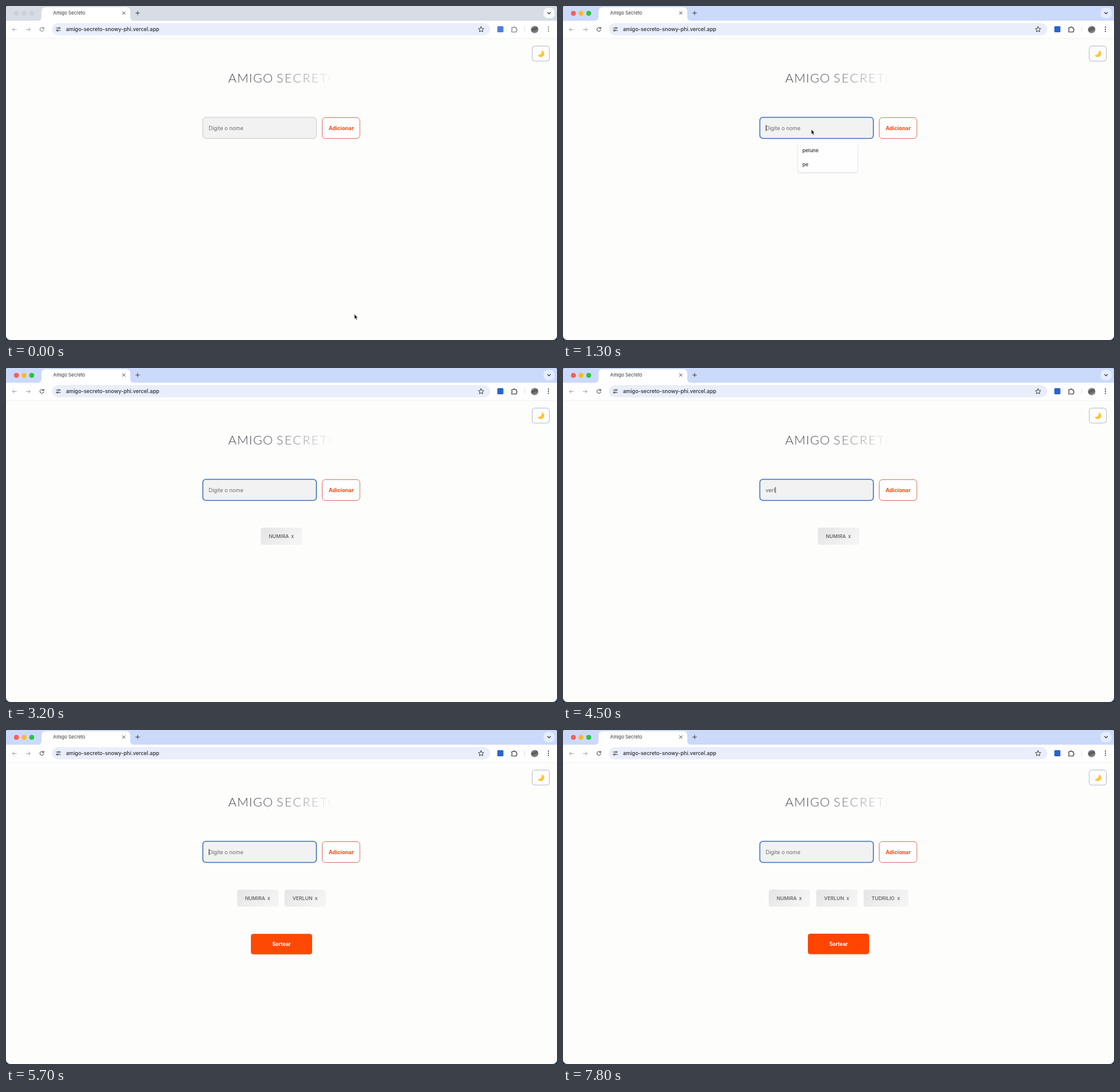
An HTML page that plays this animation: 900 px wide and 546 px high, repeating every 8000 ms.

```html
<!DOCTYPE html>
<html lang="pt">
<head>
<meta charset="utf-8">
<title>Amigo Secreto</title>
<style>
  html, body { margin: 0; width: 900px; height: 546px; overflow: hidden; background: #17304d; }
  svg { display: block; border-radius: 3px 3px 7px 7px; background: #fdfdfc; }
  text { font-family: Inter, "Liberation Sans", sans-serif; }
  .line { fill: none; stroke-linecap: round; stroke-linejoin: round; }
  .idle { --bar: #d7dce5; --ink: #777; --soft: #aaa; --r: #ccd0d8; --y: #ccd0d8; --g: #ccd0d8; --drop: #f8f9fb; --ext: #4c7fda; }
  .active { --bar: #cbdafb; --ink: #333; --soft: #a2a3a6; --r: #fb5d55; --y: #fdb92c; --g: #2bc440; --drop: #e5edfd; --ext: #2a63cb; }
  .ink { stroke: var(--ink); }
  .soft { stroke: var(--soft); }
</style>
</head>
<body>
<svg id="stage" class="idle" width="900" height="546" viewBox="0 0 900 546">
  <defs>
    <linearGradient id="fade" gradientUnits="userSpaceOnUse" x1="363" x2="534" y1="0" y2="0">
      <stop stop-color="#3c3c42"/><stop offset=".42" stop-color="#5c5c62"/>
      <stop offset=".75" stop-color="#a8a8ac"/><stop offset="1" stop-color="#fdfdfc"/>
    </linearGradient>
    <linearGradient id="chip" x2="1" y2=".4">
      <stop stop-color="#e5e5e6"/><stop offset="1" stop-color="#f4f4f4"/>
    </linearGradient>
    <linearGradient id="photo" x2=".4" y2="1">
      <stop stop-color="#b5b5b5"/><stop offset=".5" stop-color="#555"/><stop offset="1" stop-color="#8b8b8b"/>
    </linearGradient>
    <filter id="shade" x="-20%" y="-30%" width="140%" height="170%">
      <feDropShadow dx="0" dy="1" stdDeviation="1.5" flood-color="#556" flood-opacity=".25"/>
    </filter>
  </defs>

  <!-- tab strip -->
  <path d="M0 0H900V24H0Z" style="fill:var(--bar)"/>
  <circle cx="17" cy="12" r="4" style="fill:var(--r)"/>
  <circle cx="29.5" cy="12" r="4" style="fill:var(--y)"/>
  <circle cx="42" cy="12" r="4" style="fill:var(--g)"/>
  <path d="M52 24Q58 24 58 18V9Q58 2 65 2H196Q203 2 203 9V18Q203 24 209 24Z" fill="#fff"/>
  <text x="77" y="14" font-size="7.5" fill="#333">Amigo Secreto</text>
  <path class="line" stroke="#333" d="M190.5 9.5l4 4m0-4l-4 4"/>
  <path class="line" stroke="#444" d="M212 11.5h6m-3-3v6"/>
  <rect x="878" y="3" width="18" height="17" rx="7" style="fill:var(--drop)"/>
  <path class="line" stroke="#333" stroke-width="1.1" d="M884.7 10.5l2.3 2.3 2.3-2.3"/>

  <!-- toolbar -->
  <path d="M0 24H900V53H0Z" fill="#fff"/>
  <path d="M0 53H900" stroke="#eff0f3"/>
  <path class="line soft" d="M17 38.5h-6.5m2.7-2.7l-2.7 2.7 2.7 2.7M33 38.5h6.5m-2.7-2.7l2.7 2.7-2.7 2.7"/>
  <path class="line ink" d="M61.2 36.2a3.2 3.2 0 1 0 .6 2.8M61.8 34.7v2.2h-2.200"/>
  <rect x="75" y="28" width="716" height="20" rx="10" fill="#e9eefa"/>
  <path class="line" stroke="#444" d="M82 36h2.5m3.500 0h1M82 40h1m3 0h3"/>
  <circle class="line" stroke="#444" cx="86.5" cy="36" r="1.2"/>
  <circle class="line" stroke="#444" cx="84" cy="40" r="1.2"/>
  <text x="98" y="41.3" font-size="8.55" font-weight="500" fill="#2b2d31">amigo-secreto-snowy-phi.vercel.app</text>
  <path class="line" stroke="#444" d="M776 33.800l1.300 2.900 3.100.3-2.300 2.100.7 3.100-2.800-1.600-2.800 1.600.7-3.100-2.300-2.100 3.100-.3z"/>
  <rect x="802.5" y="33" width="10" height="10" rx="1.5" style="fill:var(--ext)"/>
  <path class="line ink" stroke-width="1.1" d="M826 35.5h2.500a1.400 1.400 0 0 1 2.800 0h2.200v2.200a1.400 1.400 0 0 1 0 2.800v2h-7.500v-2.200a1.400 1.400 0 0 0 0-2.600z"/>
  <path d="M847 34v8" stroke="#cfdaf3"/>
  <circle cx="863.5" cy="38.5" r="6" fill="url(#photo)"/>
  <g style="fill:var(--ink)"><circle cx="886" cy="34.5" r="1"/><circle cx="886" cy="38" r="1"/><circle cx="886" cy="41.5" r="1"/></g>

  <!-- page -->
  <rect x="859.5" y="65.5" width="28" height="24.5" rx="4" fill="#fdfdfe" stroke="#b9bcc6"/>
  <path d="M875.5 72.500A5.700 5.700 0 1 1 868.500 80.500Q875.500 80 875.500 72.500Z" fill="#fcc53a"/>
  <text y="124.5" fill="url(#fade)" style="font:300 20.5px Lato,sans-serif"><tspan x="363" letter-spacing="1">AMIGO</tspan><tspan x="442" letter-spacing="2">SECRETO</tspan></text>
  <rect id="box" x="321.5" y="182" width="185.500" height="34.500" rx="5" fill="#f2f2f2"/>
  <text id="field" x="331" y="202.500" font-size="8.700"></text>
  <path id="caret" stroke="#333" stroke-width=".9"/>
  <rect x="516.5" y="182.500" width="61.500" height="34" rx="5" fill="#fff" stroke="#dc7560"/>
  <text x="547.5" y="202.500" font-size="8.700" font-weight="700" fill="#f8480f" text-anchor="middle">Adicionar</text>
  <g id="chips"></g>
  <g id="draw">
    <rect x="400" y="333" width="100" height="33.500" rx="4" fill="#ff4500"/>
    <text x="450" y="352.500" font-size="8.300" font-weight="700" fill="#fff" text-anchor="middle">Sortear</text>
  </g>
  <g id="menu" font-size="8.200" font-weight="500" fill="#333">
    <rect x="384" y="223" width="97" height="48.500" rx="4" fill="#fefefe" filter="url(#shade)"/>
    <text x="391" y="239">pelune</text>
    <text x="391" y="261.500">pe</text>
  </g>
  <path id="mouse" d="M0 0V8.500L2 6.800 3.400 9.800 4.800 9.200 3.500 6.200H6Z" fill="#111" stroke="#fff" stroke-width=".7"/>
</svg>
<script>
const LOOP = 8000, STEP = 100;
const $ = id => document.getElementById(id);
const clamp = v => Math.max(0, Math.min(1, v));
const show = (el, on) => el.setAttribute('visibility', on ? 'visible' : 'hidden');

// name, moment of each key press, moment of Enter, chip width
const people = [
  { name: 'numira', keys: [1800, 2100, 2300, 2400, 2500, 2600], enter: 3000, w: 67.5 },
  { name: 'verlun', keys: [4000, 4100, 4200, 4500, 4600, 4700], enter: 4900, w: 67.5 },
  { name: 'tudrilio', keys: [6000, 6100, 6300, 6500, 6600, 6800, 6900, 7000], enter: 7500, w: 73 }
];
const strokes = [1100, 1300, ...people.flatMap(p => p.keys)];

function typed(t) {
  const p = people.find(p => t >= p.keys[0] && t < p.enter);
  return p ? p.name.slice(0, p.keys.filter(k => k <= t).length) : '';
}

function chips(t) {
  const list = people.filter(p => t >= p.enter);
  let x = 450 - (list.reduce((sum, p) => sum + p.w + 10, -10)) / 2;
  return list.map(({ name, w }) => {
    const chip = `<g transform="translate(${x} 261)" font-size="8.1" font-weight="500" fill="#5a5a5c">
      <rect width="${w}" height="28" rx="4" fill="url(#chip)"/>
      <text x="13" y="16.5">${name.toUpperCase()}</text><text x="${w - 18}" y="16.5">x</text></g>`;
    x += w + 10;
    return chip;
  }).join('');
}

let last = -1;
function render(t) {
  if (t === last) return;
  last = t;
  const focus = t >= 1100, text = typed(t);
  $('stage').setAttribute('class', t < 800 ? 'idle' : 'active');
  $('box').setAttribute('stroke', focus ? '#4677c0' : '#c9c9cb');
  $('box').setAttribute('stroke-width', focus ? 1.6 : 1);

  const field = $('field');
  field.textContent = text || 'Digite o nome';
  field.setAttribute('fill', text ? '#58585a' : '#6c6c6f');
  const end = 331.7 + (text ? field.getComputedTextLength() : 0);
  $('caret').setAttribute('d', `M${end} 194.5V204.5`);
  const since = t - Math.max(...strokes.filter(k => k <= t));
  show($('caret'), focus && since % 1000 < 500);

  $('chips').innerHTML = chips(t);
  const p = 1 - (1 - clamp((t - 5025) / 800)) ** 2;
  $('draw').setAttribute('opacity', p);
  $('draw').setAttribute('transform', `translate(0 ${6 * (1 - p)})`);

  show($('menu'), t >= 1200 && t < 1900);
  show($('mouse'), t < 1800);
  const u = clamp(t / 900), m = u * u * (3 - 2 * u);
  $('mouse').setAttribute('transform', `translate(${569 - 163.5 * m} ${503.5 - 302 * m})`);
}

const start = performance.now();
function tick() {
  const t = (performance.now() - start) % LOOP;
  render(Math.floor(t / STEP) * STEP);
  requestAnimationFrame(tick);
}
tick();
</script>
</body>
</html>
```
